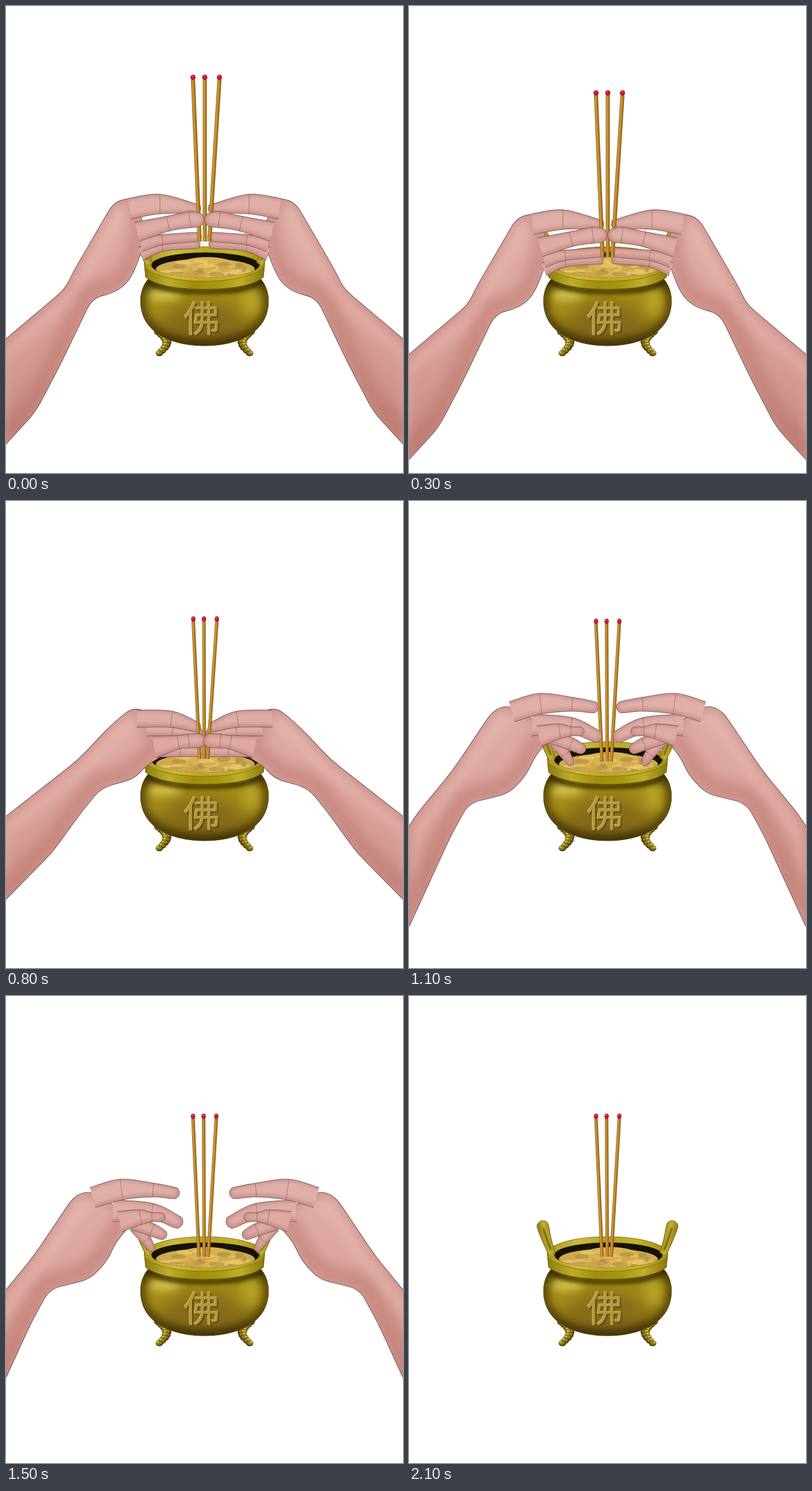
An HTML page with a canvas for the animation above (2200 ms loop, 691 px wide and 811 px high).

```html
<!DOCTYPE html>
<html lang="zh">
<head>
<meta charset="utf-8">
<title>Incense</title>
<style>
html, body { margin: 0; width: 100%; height: 100%; overflow: hidden; background: #fff; }
canvas { display: block; }
</style>
</head>
<body>
<canvas id="stage" width="691" height="811"></canvas>
<script>
const W = 691, H = 811, STEP = 100, STEPS = 22, MID = W / 2;
const ctx = document.getElementById('stage').getContext('2d');

/* ---------- helpers ---------- */

// Polygon with straight sides and softened corners.
function polygon(pts, cut = 20) {
  const path = new Path2D(), n = pts.length;
  const toward = ([ax, ay], [bx, by]) => {
    const k = Math.min(.42, cut / Math.hypot(bx - ax, by - ay));
    return [ax + (bx - ax) * k, ay + (by - ay) * k];
  };
  pts.forEach((p, i) => {
    path.lineTo(...toward(p, pts[(i + n - 1) % n]));
    path.quadraticCurveTo(...p, ...toward(p, pts[(i + 1) % n]));
  });
  path.closePath();
  return path;
}

// Tapered limb along joints [x, y, radius], open at its base and round at its tip.
function limb(joints) {
  const left = [], right = [], last = joints.length - 1, creases = [];
  let angle;
  joints.forEach(([x, y, r], i) => {
    const a = joints[Math.max(0, i - 1)], b = joints[Math.min(last, i + 1)];
    angle = Math.atan2(b[1] - a[1], b[0] - a[0]);
    const nx = Math.sin(angle) * r, ny = -Math.cos(angle) * r;
    left.push([x + nx, y + ny]);
    right.unshift([x - nx, y - ny]);
    if (i && i < last) creases.push(segment(x + nx, y + ny, x - nx, y - ny));
  });
  const [x, y, r] = joints[last];
  const tip = [-45, 0, 45].map(d => {
    const t = angle + d * Math.PI / 180;
    return [x + r * Math.cos(t), y + r * Math.sin(t)];
  });
  return { path: curve([...left, ...tip, ...right]), creases };
}

function curve(pts) {
  const path = new Path2D(), at = i => pts[Math.max(0, Math.min(pts.length - 1, i))];
  path.moveTo(...pts[0]);
  for (let i = 0; i < pts.length - 1; i++) {
    const a = at(i - 1), b = at(i), c = at(i + 1), d = at(i + 2);
    path.bezierCurveTo(b[0] + (c[0] - a[0]) / 6, b[1] + (c[1] - a[1]) / 6,
      c[0] - (d[0] - b[0]) / 6, c[1] - (d[1] - b[1]) / 6, ...c);
  }
  return path;
}

function segment(x0, y0, x1, y1) {
  const p = new Path2D();
  p.moveTo(x0, y0);
  p.lineTo(x1, y1);
  return p;
}

function ellipse(x, y, rx, ry) {
  const p = new Path2D();
  p.ellipse(x, y, rx, ry, 0, 0, Math.PI * 2);
  return p;
}

function stroke(path, color, width, blur = 0) {
  ctx.save();
  if (blur) ctx.filter = `blur(${blur}px)`;
  ctx.lineCap = ctx.lineJoin = 'round';
  ctx.strokeStyle = color;
  ctx.lineWidth = width;
  ctx.stroke(path);
  ctx.restore();
}

function fill(path, color, blur = 0) {
  ctx.save();
  if (blur) ctx.filter = `blur(${blur}px)`;
  ctx.fillStyle = color;
  ctx.fill(path);
  ctx.restore();
}

function linear(x0, y0, x1, y1, colors) {
  const g = ctx.createLinearGradient(x0, y0, x1, y1);
  colors.forEach((c, i) => g.addColorStop(i / (colors.length - 1), c));
  return g;
}

function shifted(dx, dy, draw) {
  ctx.save();
  ctx.translate(dx, dy);
  draw();
  ctx.restore();
}

function clipped(path, draw) {
  ctx.save();
  ctx.clip(path);
  draw();
  ctx.restore();
}

function bothSides(draw) {
  draw();
  ctx.save();
  ctx.translate(W, 0);
  ctx.scale(-1, 1);
  draw();
  ctx.restore();
}

function random(seed) {
  return () => (seed = seed * 16807 % 2147483647) / 2147483647;
}

/* ---------- burner ---------- */

const body = new Path2D('M248 474C231 492 230 524 243 547C262 579 306 590 345.5 590' +
  'S429 579 448 547C461 524 460 492 443 474Z');
const band = new Path2D('M241 450L243 471C262 487 305 492 345.5 492S429 487 448 471L450 450Z');
const rim = ellipse(MID, 448, 105, 30);
const hole = ellipse(347, 450, 94, 22);
const handle = limb([[249, 448, 6], [240, 424, 8], [233, 400, 10]]);

// A scrolled leg: shrinking knobs along an S.
function drawFoot() {
  for (let i = 0; i < 9; i++) {
    const t = i / 8, r = 9.5 - 3 * t;
    const x = 267 + 13 * Math.sin(t * Math.PI), y = 565 + 38 * t;
    fill(ellipse(x, y, r, r * .8), '#54440b');
    fill(ellipse(x - 1, y - 1, r * .8, r * .6), '#8f7b1a');
    fill(ellipse(x - 3, y - 2, r * .35, r * .25), '#cdb949');
  }
}

function drawHandle(pink) {
  fill(handle.path, linear(224, 410, 250, 404, ['#857311', '#c5b137', '#877512']));
  ctx.save();
  ctx.globalAlpha = pink;
  fill(handle.path, linear(0, 390, 0, 450, ['#cd9e6c', '#d0a083', '#c88f82', '#9b8617']));
  ctx.restore();
  stroke(handle.path, '#79690f', 1);
  stroke(segment(234, 404, 246, 440), pink ? '#95685c' : '#6d5c0b', 3, 1);
}

function drawBody() {
  fill(body, linear(0, 474, 0, 590, ['#5e4d08', '#a08a14', '#a38a1b', '#846b15', '#4c3a0b']));
  clipped(body, () => {
    fill(ellipse(275, 502, 30, 10), '#d6c552', 8);
    fill(ellipse(425, 512, 16, 22), '#b6a229', 9);
    fill(ellipse(343, 546, 62, 30), '#866a1b', 14);
    stroke(body, 'rgba(60,45,4,.7)', 18, 7);
    shifted(0, 5, () => stroke(band, 'rgba(58,44,0,.75)', 8, 3));
  });
  stroke(body, '#5b490b', 1);
}

function drawSand() {
  const rnd = random(77), tones = ['#e9c86a', '#a98a45', '#cba041', '#f0cf72'];
  fill(ellipse(347, 457, 86, 18), '#cfa94d');
  fill(ellipse(350, 452, 52, 16), '#d9b252');
  ctx.globalAlpha = .6;
  for (let i = 0; i < 46; i++) {
    const a = rnd() * 2 * Math.PI, d = Math.sqrt(rnd());
    fill(ellipse(347 + 76 * d * Math.cos(a), 457 + 15 * d * Math.sin(a),
      4 + rnd() * 12, 1.5 + rnd() * 3), tones[i % 4]);
  }
  ctx.globalAlpha = 1;
}

function drawGlyph() {
  ctx.font = '400 63px "Noto Sans CJK SC", "Noto Sans CJK JP", "Noto Sans CJK", sans-serif';
  ctx.textAlign = 'center';
  [[2, '#57450f'], [-1, '#d3bd62'], [0, '#b3963c']].forEach(([d, color]) => {
    ctx.fillStyle = color;
    ctx.fillText('佛', 341 + d, 566 + d);
  });
}

function drawBurner(pink) {
  bothSides(drawFoot);
  drawBody();
  fill(band, linear(241, 0, 451, 0, ['#8f7c0e', '#bfac2b', '#a18d0d', '#a8950f', '#c0ad2a', '#87750a']));
  stroke(band, '#5f500b', 1);
  fill(rim, linear(241, 0, 451, 0, ['#a8941a', '#cdbb3d', '#bba824', '#c3b22c', '#a08c10']));
  stroke(rim, '#82710d', 1);
  fill(hole, '#171205');
  clipped(hole, drawSand);
  bothSides(() => drawHandle(pink));
  drawGlyph();
}

/* ---------- incense ---------- */

function drawStick(x0, y0, x1, y1, w) {
  const strip = (k, color, width) => {
    ctx.beginPath();
    ctx.moveTo(x0 + k * w, y0);
    ctx.lineTo(x1 + k * w, y1);
    ctx.strokeStyle = color;
    ctx.lineWidth = width;
    ctx.stroke();
  };
  strip(0, '#8a5c14', w);
  strip(-.06, '#b58024', w * .7);
  strip(-.18, '#cf9d42', w * .25);
  fill(ellipse(x0, y0 - 4, w * .65, 4.8), '#b81d2b');
  fill(ellipse(x0 - 1, y0 - 6, 2, 1.6), '#e34754');
}

function drawSticks(tops, ends, tip, base, w) {
  tops.forEach((x, i) => drawStick(x, tip + 9, ends[i], base, w));
}

/* ---------- hands ---------- */

function hand(palm, fingers, thumb) {
  return { palm: polygon(palm), fingers: fingers.map(limb), thumb: limb(thumb) };
}

const low = hand(
  [[-20, 595], [103, 491], [118, 460], [188, 340], [225, 332], [245, 400], [226, 454], [212, 480],
    [190, 497], [150, 508], [95, 622], [52, 704], [0, 761], [-20, 780]],
  [[[235, 430, 12], [272, 418, 8], [330, 413, 8]],
    [[235, 414, 13], [272, 406, 9], [332, 401, 8]],
    [[215, 352, 18], [268, 344, 17], [331, 352, 8]]],
  [[228, 392, 17], [282, 378, 13], [320, 371, 14], [332, 371, 13]]);

const tilted = hand(
  [[-20, 563], [125, 450], [182, 390], [216, 361], [240, 362], [275, 441], [246, 458], [222, 483],
    [166, 498], [130, 542], [80, 611], [-20, 712]],
  [[[262, 430, 15], [304, 431, 13], [335, 433, 11]],
    [[245, 394, 14], [290, 398, 11], [333, 404, 10]],
    [[228, 378, 15], [288, 379, 14], [330, 392, 9]]],
  [[258, 427, 19], [300, 419, 12], [318, 417, 12], [335, 416, 12]]);

const open = hand(
  [[-20, 566], [0, 535], [62, 460], [132, 356], [160, 346], [240, 395], [206, 434], [190, 468],
    [160, 500], [90, 517], [58, 575], [-20, 745]],
  [[[240, 408, 12], [258, 432, 9], [267, 446, 6]],
    [[235, 402, 12], [268, 414, 11], [285, 422, 9]],
    [[200, 381, 19], [268, 382, 14], [311, 400, 11]],
    [[165, 358, 18], [215, 344, 18], [270, 345, 12], [306, 350, 10]]],
  [[212, 400, 18], [248, 392, 13], [268, 392, 8], [283, 392, 8]]);

const EDGE = '#7d5552', FOLD = 'rgba(132,82,78,.7)';
const skin = () => linear(0, 325, 0, 745, ['#e0b0aa', '#dda9a2', '#d9a199', '#d2978d', '#c5877c']);

function drawDigit({ path, creases }) {
  fill(path, skin());
  clipped(path, () => shifted(0, -1, () => stroke(path, 'rgba(160,95,92,.45)', 7, 3)));
  creases.forEach(c => stroke(c, FOLD, .9));
  stroke(path, EDGE, 1);
}

function drawHand({ palm, fingers }) {
  fill(palm, skin());
  clipped(palm, () => {
    shifted(12, 14, () => stroke(palm, 'rgba(236,195,187,.4)', 20, 9));
    shifted(-9, -12, () => stroke(palm, 'rgba(176,106,98,.4)', 32, 10));
  });
  stroke(palm, EDGE, 1.1);
  fingers.forEach(drawDigit);
}

/* ---------- timeline ---------- */

// Hands hold the sticks between fingers and thumbs.
function drawHold(pose, dy, drawIncense) {
  const pair = draw => bothSides(() => shifted(0, dy, draw));
  pair(() => drawHand(pose));
  shifted(0, dy, drawIncense);
  pair(() => drawDigit(pose.thumb));
}

function drawStep(n) {
  ctx.fillStyle = '#fff';
  ctx.fillRect(0, 0, W, H);
  drawBurner(n < 16 ? 0 : Math.min(1, (21 - n) / 3));

  if (n < 6) {
    drawHold(low, n * 9, () => drawSticks([325.5, 346, 371.5], [337, 346, 354], 119, 409, 7));
  } else if (n < 11) {
    drawHold(tilted, Math.min(5, (n - 8) * 3.5),
      () => drawSticks([326, 344.5, 367], [337, 345, 351], 200, 448, 6));
  } else {
    drawSticks([325.5, 344, 366], [336, 345, 352], 204, 453, 6);
    if (n < 16) bothSides(() => shifted((13 - n) * 7, (13 - n) * 4, () => {
      drawHand(open);
      drawDigit(open.thumb);
    }));
  }
}

let shown = -1;
function tick(now) {
  const n = Math.floor(now / STEP) % STEPS;
  if (n !== shown) drawStep(shown = n);
  requestAnimationFrame(tick);
}
drawStep(0);
requestAnimationFrame(tick);
</script>
</body>
</html>
```
